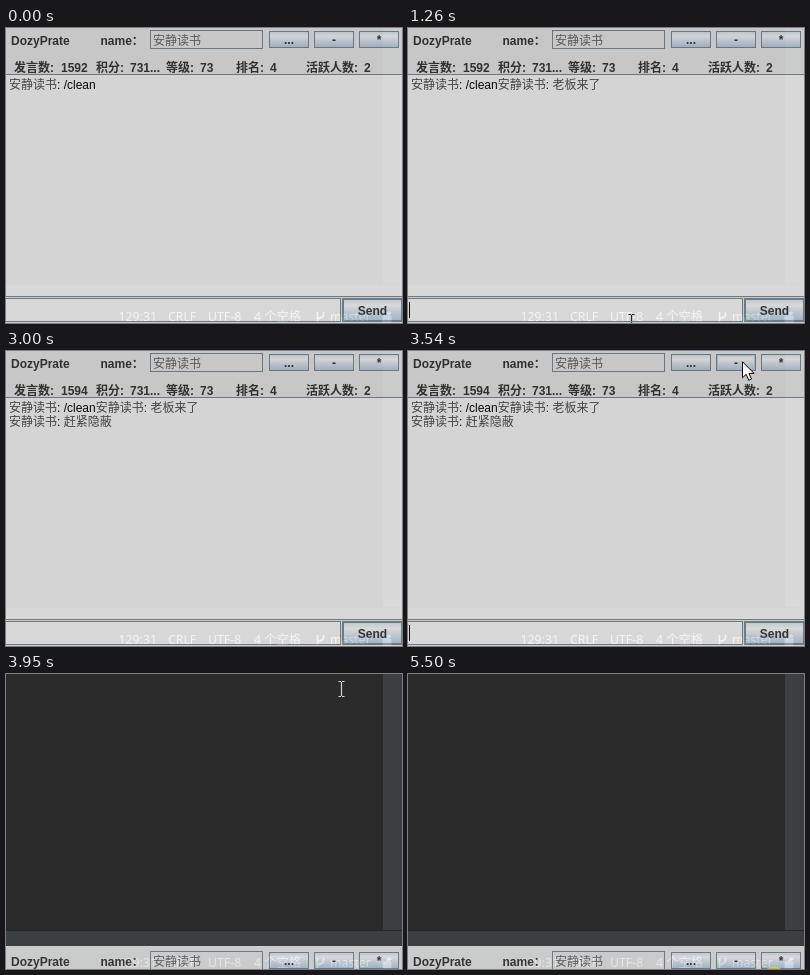
Recreate the animation shown at these times as an HTML page. Size 396x295 px, loop 5.76 s.

```html
<!DOCTYPE html>
<html lang="zh">
<head>
<meta charset="utf-8">
<style>
  html, body { margin: 0; width: 100%; height: 100%; overflow: hidden; background: #2b2b2b; }
  svg { display: block; width: 396px; height: 295px; isolation: isolate; }
  text { font: 12px "Liberation Sans", "Noto Sans CJK SC", "Noto Sans CJK", sans-serif; white-space: pre; }
  .han { fill: #4c4c4c; font-weight: 300; }
  .status text { font: 12.3px "Noto Sans", "Noto Sans CJK SC", "Noto Sans CJK", sans-serif; fill: #c4c4c4; }
  .bold text { font-weight: bold; fill: #333; }
  .edge { stroke: #7a8a99; }
  .middle { text-anchor: middle; }
  .glow { fill: none; }
  .pressed .face { fill: #b8cfe5; }
  .pressed .glow, #send .glow { stroke: #7a8a99; }
  .hover .glow { stroke: #b8cfe5; }
  #beam { mix-blend-mode: difference; }
</style>
</head>
<body>
<svg viewBox="0 0 396 295">
  <defs>
    <linearGradient id="metal" x2="0" y2="1">
      <stop offset="0" stop-color="#dde8f3"/>
      <stop offset=".3" stop-color="#fff"/>
      <stop offset=".6" stop-color="#dde8f3"/>
      <stop offset="1" stop-color="#b8cfe5"/>
    </linearGradient>
  </defs>

  <!-- editor behind the chat window -->
  <rect width="396" height="295" fill="#3c3f41"/>
  <rect width="377" height="257" fill="#2b2b2b"/>
  <rect y="256" width="396" height="1" fill="#282828"/>
  <g class="status">
    <text x="112.5" y="293">129:31</text>
    <text x="162" y="293">CRLF</text>
    <text x="202" y="293">UTF-8</text>
    <text x="248" y="293">4 个空格</text>
    <text x="324" y="293">master</text>
    <path d="M311.5 284v10M317.5 284v3q0 2-6 4" fill="none" stroke="#c4c4c4" stroke-width="1.6"/>
    <path d="M377 288h8v6h-8zM381 288v-2q0-2 2-2t2 2" fill="#c4c4c4" stroke="#c4c4c4"/>
  </g>

  <g id="window" opacity=".8">
    <rect y="-3" width="396" height="300" fill="#eee"/>
    <rect x="144.5" y="2.5" width="112" height="18" fill="#eee" class="edge"/>
    <text x="147" y="17" fill="#666">安静读书</text>
    <g id="labels" class="bold">
      <text x="5" y="17">DozyPrate</text>
      <text x="94.5" y="17">name：</text>
      <text x="55" y="44" id="count"></text>
    </g>
    <rect x="-1" y="46.5" width="398" height="222" fill="#fff" class="edge"/>
    <rect x="-.5" y="270.5" width="335" height="23" fill="#fff" class="edge"/>
    <text x="3" y="61" id="line1"></text>
    <text x="3" y="75" id="line2"></text>
    <text x="1" y="287" id="input" class="han"></text>
    <rect id="caret" y="274" width="1" height="16"/>
    <g id="buttons" class="bold middle"></g>
  </g>

  <circle id="click" r="12" fill="#dcdc28" opacity=".7"/>
  <path id="arrow" d="M0 0V16L3.7 12.6 6.3 18.5 9 17.3 6.4 11.6H11.5Z" fill="#fff" stroke="#000"/>
  <path id="beam" d="M-3 -7.5H-.5M.5 -7.5H3M0 -7V7M-3 7.5H-.5M.5 7.5H3" stroke="#fff" stroke-width="1.2"/>
</svg>
<script>
const $ = id => document.getElementById(id);
const LOOP = 5760, FIRST = '老板来了', SECOND = '赶紧隐蔽';
const han = s => `<tspan class="han">${s}</tspan>`;
const SPEAKER = han('安静读书') + ': ';

const stats = [[8, '发言数:'], [90, '积分:'], [124, '731...'], [160, '等级:'], [194, '73'],
  [230, '排名:'], [264, '4'], [300, '活跃人数:'], [358, '2']];
$('labels').innerHTML += stats.map(([x, s]) => `<text x="${x}" y="44">${s}</text>`).join('');

const button = (id, x, y, w, h, label, base) => `<g id="${id}">
  <rect class="face edge" x="${x + .5}" y="${y + .5}" width="${w - 1}" height="${h - 1}" fill="url(#metal)"/>
  <rect class="glow" x="${x + 1.5}" y="${y + 1.5}" width="${w - 3}" height="${h - 3}"/>
  <text x="${x + w / 2}" y="${base}">${label}</text></g>`;
$('buttons').innerHTML = button('more', 263, 3, 40, 17, '...', 16) + button('mini', 308, 3, 40, 17, '-', 16) +
  button('star', 353, 3, 40, 17, '*', 16) + button('send', 336, 270, 61, 24, 'Send', 287);

const within = (t, a, b) => t >= a && t < b;
// progress 0..1 from a to b, advancing in n jumps
const steps = (t, a, b, n) => Math.min(1, Math.floor((t - a) / (b - a) * n + .01) / n);
const ease = p => 1 - (1 - p) ** 2;

function typed(t) {
  if (within(t, 440, 1050)) return FIRST.slice(0, t < 590 ? 2 : 4);
  if (within(t, 1660, 2250)) return SECOND.slice(0, t < 1920 ? 2 : 4);
  return '';
}

function pointer(t) {
  if (within(t, 210, 440)) return ['beam', 224.5, 295];
  if (within(t, 440, 590)) return ['beam', t < 510 ? 229.5 : 226.5, 294];
  if (within(t, 590, 2930)) return ['beam', 223.5, 294];
  if (within(t, 2930, 3000)) return ['beam', 342.5, 143];
  if (within(t, 3270, 3950)) {
    const p = ease(steps(t, 3270, 3740, 6));
    return ['arrow', 336 - 2 * p, 1 + 13 * p];
  }
  if (within(t, 3950, 4570)) {
    const p = steps(t, 3950, 4500, 7);
    return [p < .95 ? 'beam' : 'arrow', 335.5 + 37 * p, 15 + 270 * p];
  }
  return [];
}

function place(id, show, x, y) {
  $(id).style.display = show ? '' : 'none';
  if (show) $(id).setAttribute('transform', `translate(${x} ${y})`);
}

function draw(t) {
  $('window').setAttribute('transform', `translate(0 ${t < 3950 ? 0 : 275})`);
  $('count').textContent = 1592 + (t >= 1330) + (t >= 2320);
  $('line1').innerHTML = SPEAKER + '/clean' + (t >= 1260 ? SPEAKER + han(FIRST) : '');
  $('line2').innerHTML = t >= 2250 ? SPEAKER + han(SECOND) : '';

  const text = typed(t);
  $('input').textContent = text;
  place('caret', text || within(t, 1260, 2730) || within(t, 3270, 3740), 1 + 12 * text.length, 0);

  const [kind, x, y] = pointer(t);
  for (const id of ['beam', 'arrow']) place(id, id === kind, x, y);
  const pressing = within(t, 3740, 3950);
  place('click', pressing || t >= 5500, pressing ? 333.5 : 366, pressing ? 14.5 : 304.5);
  $('mini').setAttribute('class', pressing ? 'pressed' : within(t, 3350, 3740) ? 'hover' : '');
  $('star').setAttribute('class', within(t, 4500, 4570) ? 'hover' : '');
}

const start = performance.now();
(function frame() {
  draw((performance.now() - start) % LOOP);
  requestAnimationFrame(frame);
})();
</script>
</body>
</html>
```
